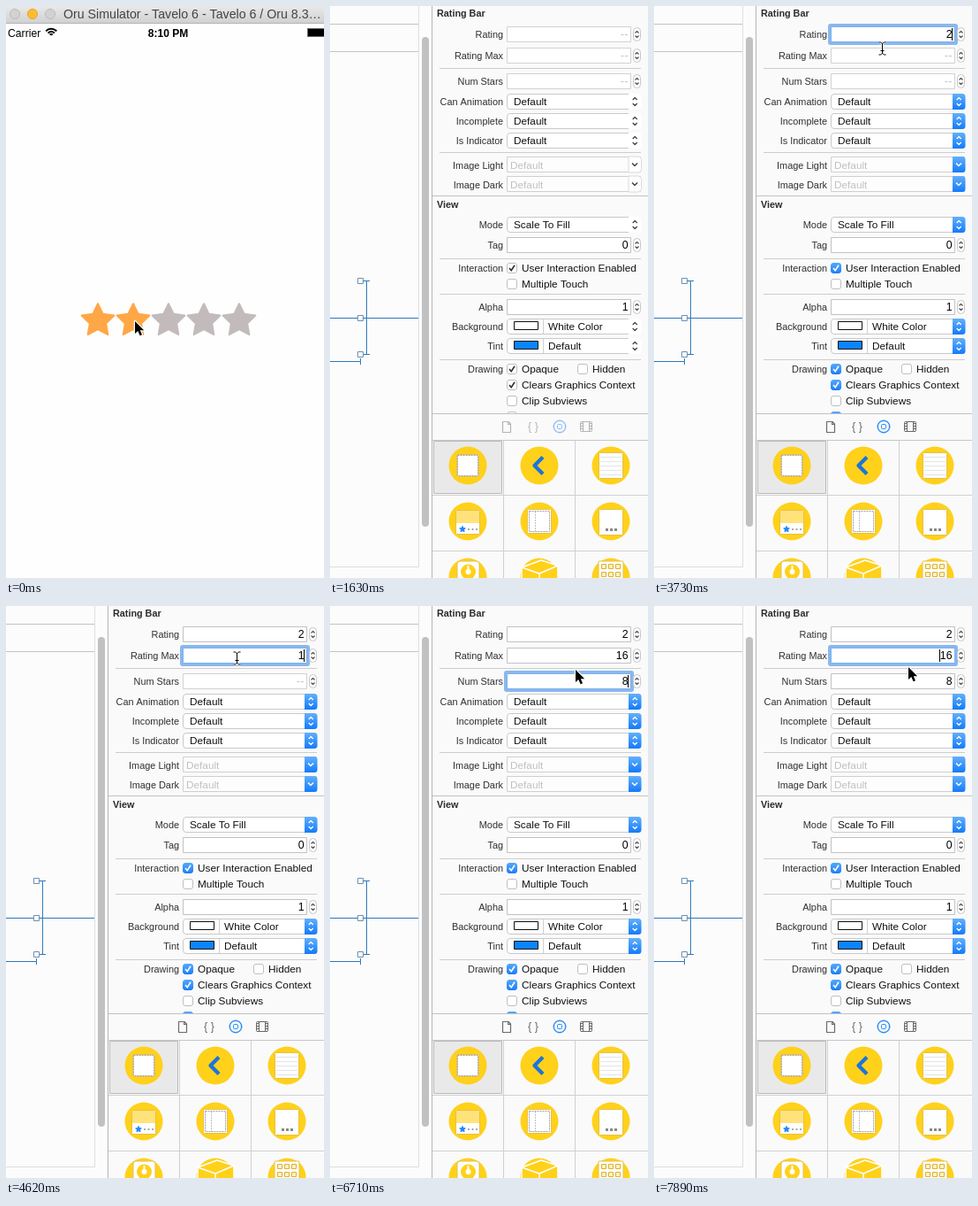
Write an HTML page with a canvas that moves like this. It is 360 px wide and 646 px high and loops after 8000 ms.

```html
<!DOCTYPE html>
<html lang="en">
<head>
<meta charset="utf-8">
<title>Rating bar</title>
<style>
html, body { margin: 0; width: 100%; height: 100%; overflow: hidden; background: #fefefe; }
canvas { display: block; }
</style>
</head>
<body>
<canvas id="stage" width="360" height="646"></canvas>
<script>
const ctx = document.getElementById('stage').getContext('2d');
const LOOP = 8000;
const SANS = '"Liberation Sans", Arial, sans-serif';
const BLUE = '#1d85fb', YELLOW = '#ffd11a', INK = '#2b2b2b';

// Each step overrides part of the state from its time on.
// field: focused row, ring: [outset, alpha], caret: x or 0, pointer: [x, y, shape]
const STEPS = [
  [0, { app: 'device', active: false, values: ['', '', ''], field: -1, ring: [0, 0], caret: 0, pointer: [146, 356, 'arrow'] }],
  [450, { pointer: [168, 404, 'arrow'] }],
  [600, { pointer: [200, 467, 'arrow'] }],
  [750, { pointer: [184, 398, 'arrow'] }],
  [900, { pointer: [142, 262, 'arrow'] }],
  [1050, { pointer: [96, 122, 'arrow'] }],
  [1200, { pointer: [53, 2, 'arrow'] }],
  [1330, { pointer: null }],
  [1630, { app: 'editor' }],
  [1780, { active: true }],
  [2080, { pointer: [318, 72, 'arrow'] }],
  [2230, { pointer: [272, 44, 'beam'] }],
  [2380, { pointer: [255, 37, 'beam'], field: 0, ring: [15, .12] }],
  [2530, { ring: [7, .27], caret: 337 }],
  [2680, { ring: [3, .6] }],
  [3130, { caret: 0 }],
  [3580, { values: ['2', '', ''], caret: 337 }],
  [3730, { pointer: [258, 48, 'beam'] }],
  [3880, { pointer: [261, 59, 'beam'] }],
  [4170, { field: 1, ring: [4, .35] }],
  [4320, { ring: [3, .6] }],
  [4620, { values: ['2', '1', ''] }],
  [5070, { values: ['2', '16', ''] }],
  [5220, { pointer: [266, 76, 'arrow'] }],
  [5370, { pointer: [269, 86, 'beam'], field: 2, ring: [23, .07] }],
  [5520, { ring: [7, .27] }],
  [5670, { ring: [3, .6] }],
  [5820, { values: ['2', '16', '8'] }],
  [5960, { pointer: [278, 72, 'arrow'] }],
  [6260, { caret: 0 }],
  [6710, { caret: 337 }],
  [6850, { pointer: [280, 66, 'beam'] }],
  [7000, { pointer: [278, 57, 'beam'] }],
  [7150, { pointer: [278, 54, 'beam'], caret: 0 }],
  [7300, { pointer: [280, 55, 'beam'] }],
  [7590, { field: 1, ring: [13, .14], caret: 323 }],
  [7740, { ring: [6, .3], pointer: [285, 62, 'beam'] }],
  [7890, { ring: [3, .6], pointer: [288, 69, 'arrow'] }]
];

function stateAt(t) {
  return Object.assign({}, ...STEPS.filter(s => s[0] <= t).map(s => s[1]));
}

function text(str, x, y, { size = 11.8, color = '#111', align = 'left', weight = '' } = {}) {
  ctx.font = `${weight} ${size}px ${SANS}`;
  ctx.fillStyle = color;
  ctx.textAlign = align;
  ctx.fillText(str, x, y);
}
function rect(x, y, w, h, fill) {
  ctx.fillStyle = fill;
  ctx.fillRect(x, y, w, h);
}
function box(x, y, w, h, r, fill, stroke) {
  ctx.beginPath();
  ctx.roundRect(x, y, w, h, r);
  paint(fill, stroke);
}
function disc(x, y, r, fill, stroke) {
  ctx.beginPath();
  ctx.arc(x, y, r, 0, 7);
  paint(fill, stroke);
}
function paint(fill, stroke, width = 1) {
  if (fill) { ctx.fillStyle = fill; ctx.fill(); }
  if (stroke) { ctx.strokeStyle = stroke; ctx.lineWidth = width; ctx.stroke(); }
}
function shade(top, bottom, from, to) {
  const fill = ctx.createLinearGradient(0, top, 0, bottom);
  fill.addColorStop(0, from);
  fill.addColorStop(1, to);
  return fill;
}
function path(points, close) {
  ctx.beginPath();
  for (const [x, y] of points) ctx.lineTo(x, y);
  if (close) ctx.closePath();
}
function line(points, color, width = 1) {
  path(points);
  paint(null, color, width);
}
function star(x, y, outer, inner, color, width) {
  path(Array.from({ length: 10 }, (_, i) => {
    const r = i % 2 ? inner : outer, a = i * Math.PI / 5;
    return [x + r * Math.sin(a), y - r * Math.cos(a)];
  }), true);
  paint(color, color, width);
}
function chevron(x, y, w, h, color, width = 1.3) {
  line([[x - w, y - h], [x, y], [x + w, y - h]], color, width);
}
function upDown(x, y, color, w = 2.5, gap = 2) {
  chevron(x, y - gap - w, w, -w, color);
  chevron(x, y + gap + w, w, w, color);
}

function drawPointer([x, y, shape]) {
  ctx.save();
  ctx.translate(x, y);
  if (shape === 'arrow') {
    path([[0, 0], [0, 14], [3.3, 11], [5.6, 16.3], [8, 15.2], [5.8, 10.2], [10.2, 10.2]], true);
    paint(null, '#fff', 2.4);
    paint('#000');
  } else {
    for (const [color, width] of [['#fff', 2.4], ['#000', 1]]) {
      for (const s of [-1, 1]) {
        line([[-3.5, s * 7], [-1.5, s * 7], [.5, s * 5.5], [2.5, s * 7], [4.5, s * 7]], color, width);
      }
      line([[.5, -6], [.5, 6]], color, width);
      line([[-1.5, 2.5], [2.5, 2.5]], color, width);
    }
  }
  ctx.restore();
}

function drawDevice() {
  rect(0, 0, 360, 646, '#fefefe');
  rect(0, 0, 360, 19, shade(0, 19, '#e9e9e9', '#d1d1d1'));
  rect(0, 19, 360, 1, '#b4b4b4');
  [10, 30, 50].forEach((x, i) =>
    disc(x, 9, 5.5, i === 1 ? '#fdbd2f' : '#d2d2d2', i === 1 ? '#e5a52a' : '#bababa'));
  text('Oru Simulator - Tavelo 6 - Tavelo 6 / Oru 8.3…', 65, 14, { size: 14.2, color: '#444' });

  text('Carrier', 2, 35, { size: 12.2, color: '#000' });
  text('8:10 PM', 183.5, 35, { size: 12, color: '#000', align: 'center', weight: 'bold' });
  for (const r of [2, 5, 8.3]) {
    ctx.beginPath();
    ctx.arc(51.2, 34, r, -Math.PI * .76, -Math.PI * .24);
    paint(null, '#000', 2);
  }
  rect(341, 25, 19, 10, '#666');
  rect(342, 26, 18, 8, '#000');

  for (let i = 0; i < 5; i++) {
    star(104 + 40 * i, 355.5, 19.3, 9.6, i < 2 ? '#ffa746' : '#c3bbbb', 2);
  }
}

function drawCanvasPane() {
  rect(0, 0, 116, 646, '#fcfcfc');
  rect(0, 20, 100, 1, '#c3c3c3');
  rect(0, 51, 100, 1, '#c3c3c3');
  rect(100, 0, 1, 634, '#dedede');
  rect(0, 633, 100, 1, '#dedede');
  box(104, 35, 8, 553, 4, '#c1c1c1');
  const guide = '#2f79bd';
  rect(0, 352, 100, 1, guide);
  rect(41, 310, 1, 84, guide);
  rect(38, 310, 7, 1, guide);
  rect(38, 393, 7, 1, guide);
  rect(0, 401, 35, 1, guide);
  rect(34, 398, 1, 7, guide);
  for (const y of [310, 352, 393]) box(31.5, y - 2.5, 6, 6, 0, '#fff', '#6d8fae');
}

function label(str, y) {
  text(str, 196, y + 4, { size: 10.9, color: '#303030', align: 'right' });
}
function field(y, value, border = value ? '#c2c2c2' : '#d2d2d2') {
  box(200.5, y - 8.5, 140, 17, 0, '#fff', border);
  if (value) text(value, 337.5, y + 4, { size: 12.3, color: '#000', align: 'right' });
  else text('--', 337.5, y + 4, { size: 13, color: '#c4c4c4', align: 'right' });
  box(343.5, y - 7.5, 8, 15, 4, '#fff', '#c6c6c6');
  upDown(347.5, y, '#555', 2, 1.5);
}
function arrowButton(y, active, border) {
  const fill = active ? shade(y - 9, y + 9, '#62b0fb', '#147afa') : '#fff';
  box(338, y - 9, 14.5, 18, [0, 3.5, 3.5, 0], fill, active ? null : border);
  return active ? '#fff' : '#444';
}
function popup(y, value, active, swatch) {
  box(200.5, y - 8.5, 151, 17, 3.5, '#fff', '#c9c9c9');
  upDown(345.2, y, arrowButton(y, active));
  if (swatch) {
    box(208.5, y - 5.5, 27, 9, 0, swatch, '#111');
    rect(241, y - 8, 1, 16, '#cfcfcf');
  }
  text(value, swatch ? 247 : 208, y + 4);
}
function combo(y, active) {
  box(200.5, y - 8.5, 151, 17, 0, '#fdfdfd', '#cfcfcf');
  text('Default', 204, y + 5, { color: '#c0c0c0' });
  chevron(345, y + 1.5, 3, 3, arrowButton(y, active, '#dadada'), 1.5);
}
function check(x, y, str, checked, active) {
  const filled = checked && active;
  const fill = filled ? shade(y - 6, y + 6, '#55a9fb', '#1a7dfa') : '#fff';
  box(x + .5, y - 5.5, 11, 11, 2.5, fill, filled ? fill : '#bfbfbf');
  if (checked) line([[x + 3, y], [x + 5.2, y + 2.8], [x + 9, y - 3.2]], filled ? '#fff' : '#333', 1.6);
  text(str, x + 17, y + 4);
}

function drawInspector({ active, values, field: focus, ring: [outset, alpha], caret }) {
  rect(116, 0, 244, 646, '#fafafa');
  for (const y of [70, 165, 285, 325, 399]) rect(124, y, 228, 1, '#cdcdcd');
  rect(116, 214, 244, 1, '#c2c2c2');
  text('Rating Bar', 121, 12, { size: 10.8, weight: 'bold', color: INK });
  text('View', 121, 228, { size: 10.8, weight: 'bold', color: INK });

  const rows = [32, 56, 85];
  if (focus >= 0) {
    const y = rows[focus];
    box(200 - outset, y - 9 - outset, 141 + 2 * outset, 18 + 2 * outset,
      Math.min(outset, 6), `rgba(62,140,232,${alpha})`);
  }
  rows.forEach((y, i) => field(y, values[i], i === focus ? '#7db1ec' : undefined));
  if (caret) rect(caret, rows[focus] - 7, 1, 14, '#000');

  const labels = {
    Rating: 32, 'Rating Max': 56, 'Num Stars': 85, 'Can Animation': 108, Incomplete: 130,
    'Is Indicator': 152, 'Image Light': 180, 'Image Dark': 202, Mode: 247, Tag: 270,
    Interaction: 296, Alpha: 340, Background: 362, Tint: 384, Drawing: 410
  };
  for (const name in labels) label(name, labels[name]);

  for (const y of [108, 130, 152]) popup(y, 'Default', active);
  combo(179, active);
  combo(201, active);
  popup(247, 'Scale To Fill', active);
  field(270, '0');
  check(200, 296, 'User Interaction Enabled', true, active);
  check(200, 314, 'Multiple Touch', false, active);
  field(340, '1');
  popup(362, 'White Color', active, '#fff');
  popup(384, 'Default', active, '#0a84ff');
  check(200, 410, 'Opaque', true, active);
  check(280, 410, 'Hidden', false, active);
  check(200, 428, 'Clears Graphics Context', true, active);
  check(200, 446, 'Clip Subviews', false, active);
  check(200, 464, 'Autoresize Subviews', true, active);
}

function drawTabs(active) {
  rect(116, 460, 244, 186, '#fafafa');
  rect(116, 460, 244, 1, '#c2c2c2');
  rect(116, 490, 244, 1, '#c8c8c8');
  const ink = active ? '#6a6a6a' : '#b5b5b5', blue = active ? '#2589f5' : '#8dbdf3';
  line([[202, 469.5], [195.5, 469.5], [195.5, 481.5], [204.5, 481.5], [204.5, 472], [202, 469.5], [201.5, 472.5], [204.5, 472.5]], ink, 1.2);
  text('{ }', 230, 479, { size: 12.5, color: ink, align: 'center' });
  disc(260, 475, 6.5, null, blue);
  disc(260, 475, 7, null, blue);
  box(257.5, 472.5, 5, 5, 1, null, blue);
  box(283.5, 469.5, 13, 11, 1, null, ink);
  for (const x of [286, 293]) rect(x, 470, 1, 11, ink);
  for (let y = 471; y < 481; y += 3) {
    rect(284, y, 2, 1, ink);
    rect(294, y, 2, 1, ink);
  }
}

function drawLibrary() {
  for (const y of [552, 615]) rect(116, y, 244, 1, '#d0d0d0');
  for (const x of [196, 277]) rect(x, 491, 1, 155, '#d0d0d0');
  box(117.5, 491.5, 77, 59, 0, '#e9e9e9', '#b9b9b9');
  for (const y of [519, 582, 645]) {
    for (const x of [156, 237, 318]) disc(x, y, 21.5, YELLOW);
  }
  const edge = '#e6c04a', dash = '#a0a0a0';
  const sheet = (x, y, w, h) => box(x - w / 2, y - h / 2, w, h, 1, '#fff', edge);
  const dashed = (x, y, w, h) => {
    ctx.setLineDash([2, 1]);
    box(x - w / 2, y - h / 2, w, h, 0, null, dash);
    ctx.setLineDash([]);
  };

  sheet(156, 519, 25, 25);
  dashed(156, 519, 23, 23);

  line([[241, 509.5], [231.5, 519], [241, 528.5]], '#1b74df', 4.3);

  sheet(318, 519, 27, 29);
  for (let y = 509; y < 533; y += 5) rect(306, y, 24, 1, '#e4e4e4');

  sheet(156, 583, 27, 27);
  rect(143, 570, 26, 14, '#ffe37a');
  star(150, 591, 3.6, 1.7, BLUE, .8);
  for (const x of [157, 161.5, 166]) disc(x, 591, 1.1, '#999');

  sheet(237, 582, 27, 27);
  dashed(237, 582, 23, 23);
  ctx.setLineDash([2, 1]);
  line([[232.5, 571], [232.5, 594]], '#c0c0c0');
  ctx.setLineDash([]);

  sheet(318, 583, 27, 29);
  for (const x of [313, 318, 323]) rect(x - 1, 590, 3, 3, '#888');

  box(144, 627, 25, 24, 3, '#fff', edge);
  disc(156.5, 639, 8.5, YELLOW);
  disc(156.5, 639, 3, '#fff');
  rect(155.5, 632, 2, 6, '#fff');

  path([[217, 634], [239, 626], [258, 632], [258, 650], [217, 650]], true);
  paint(YELLOW, '#fff', 1.5);
  line([[217, 634], [237, 641], [258, 632]], '#fff', 1.5);
  line([[237, 641], [237, 646]], '#fff', 1.5);

  sheet(318, 641, 28, 28);
  for (const y of [630, 639]) {
    for (const x of [307, 315, 323]) box(x + .5, y + .5, 5, 5, 0, '#fff3c0', '#dcb030');
  }
}

function drawEditor(state) {
  drawInspector(state);
  drawTabs(state.active);
  drawLibrary();
  drawCanvasPane();
  rect(115, 0, 1, 646, '#b5b5b5');
}

function frame(now) {
  const state = stateAt(now % LOOP);
  ctx.lineJoin = 'round';
  if (state.app === 'device') drawDevice();
  else drawEditor(state);
  if (state.pointer) drawPointer(state.pointer);
  requestAnimationFrame(() => frame(performance.now() - start));
}
const start = performance.now();
frame(0);
</script>
</body>
</html>
```
